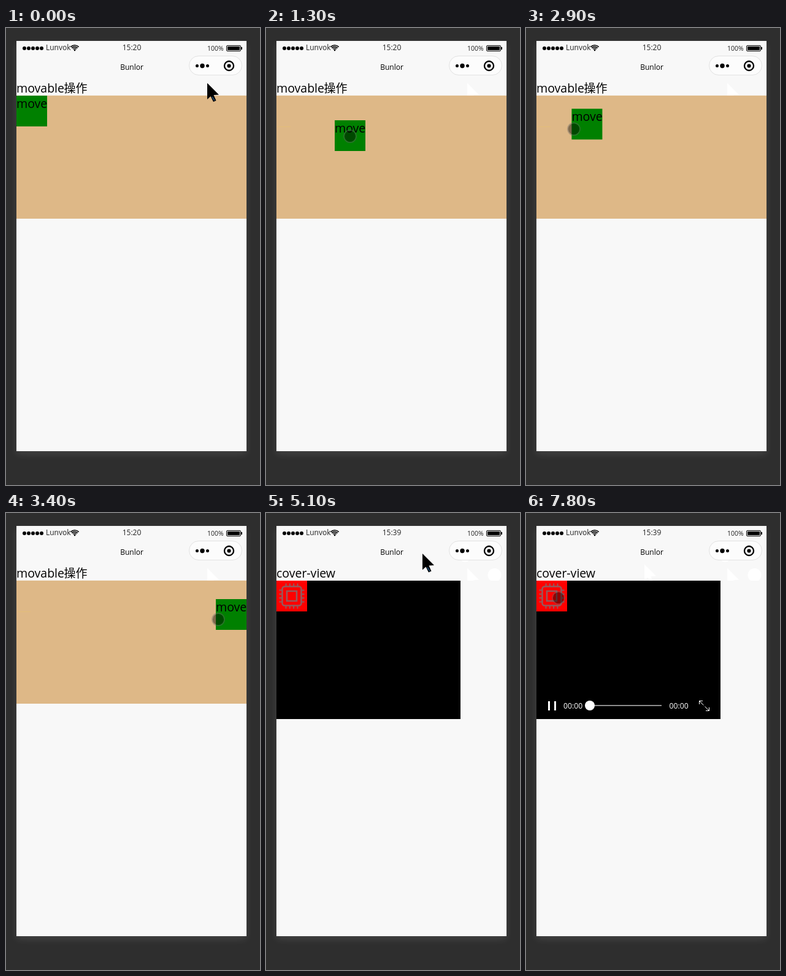
An HTML page with a canvas for the animation above (8000 ms loop, 414 px wide and 743 px high).

```html
<!DOCTYPE html>
<html lang="zh">
<head>
<meta charset="utf-8">
<title>movable / cover-view</title>
<style>
html, body { margin: 0; width: 100%; height: 100%; overflow: hidden; background: #2e2e2e; }
canvas { display: block; }
</style>
</head>
<body>
<canvas id="stage" width="414" height="743"></canvas>
<script>
const c = document.getElementById('stage').getContext('2d');
const LOOP = 8000, STEP = 100, SWITCH = 4800;
const SANS = '"Open Sans", "Noto Sans", sans-serif';
const CJK = '"Noto Sans CJK SC", "Noto Sans CJK", sans-serif';
const TAU = Math.PI * 2;

// Each move runs from t0 to t1 and ends at [x, y]; sag bends its path,
// grab is where the finger holds the box when the move ends.
const drags = [
  { t0: 400, t1: 800, to: [113.4, 153.4] },
  { t0: 800, t1: 1100, to: [233, 150] },
  { t0: 1100, t1: 1300, to: [112, 150] },
  { t0: 1300, t1: 1800, to: [236, 110], sag: 70, grab: [57.5, 13.5] },
  { t0: 2100, t1: 2900, to: [74.4, 131.3], sag: 33, grab: [3.6, 33] },
  { t0: 2900, t1: 3400, to: [342, 140], grab: [4, 33] },
  { t0: 3400, t1: 3700, to: [142, 142], grab: [18, 48] },
  { t0: 4100, t1: 4400, to: [342, 110], sag: -16, ease: 1.6, grab: [61, 50] }
];
const taps = [
  { t0: 5200, t1: 5700, to: [46, 160], sag: 40 },
  { t0: 5800, t1: 6200, to: [43, 139] },
  { t0: 6400, t1: 6900, to: [58, 145] },
  { t0: 7000, t1: 7200, to: [53, 138] }
];

const mix = (a, b, k) => a.map((v, i) => v + (b[i] - v) * k);
const progress = (t, t0, t1) => Math.min(1, Math.max(0, (t - t0) / (t1 - t0)));

function follow(moves, t, pos, hold = [25, 26]) {
  for (const { t0, t1, to, sag = 0, ease = 1, grab = hold } of moves) {
    if (t < t0) break;
    const k = progress(t, t0, t1);
    const e = k ** ease;
    pos = mix(pos, to, e);
    pos[1] += sag * Math.sin(Math.PI * k);
    hold = mix(hold, grab, e);
  }
  return { pos, finger: [pos[0] + hold[0], pos[1] + hold[1]] };
}

function rect(x, y, w, h, color) {
  c.fillStyle = color;
  c.fillRect(x, y, w, h);
}

function disc(x, y, r, color) {
  c.fillStyle = color;
  c.beginPath();
  c.arc(x, y, r, 0, TAU);
  c.fill();
}

function arc(x, y, r, width, color, from = 0, to = TAU) {
  c.strokeStyle = color;
  c.lineWidth = width;
  c.beginPath();
  c.arc(x, y, r, from, to);
  c.stroke();
}

function rounded(x, y, w, h, r, stroke, width = 1, fill = 'transparent') {
  c.strokeStyle = stroke;
  c.lineWidth = width;
  c.fillStyle = fill;
  c.beginPath();
  c.roundRect(x, y, w, h, r);
  c.fill();
  c.stroke();
}

function line(points, width, color) {
  c.strokeStyle = color;
  c.lineWidth = width;
  c.beginPath();
  points.forEach(([x, y]) => c.lineTo(x, y));
  c.stroke();
}

function text(str, x, y, size, color = '#000', align = 'left', font = SANS, weight = 400) {
  c.font = `${weight} ${size}px ${font}`;
  c.fillStyle = color;
  c.textAlign = align;
  c.fillText(str, x, y);
}

function arrow(x, y, color) {
  const shape = [[0, -0.5], [0, 26], [5.5, 21], [10, 30], [14.5, 28], [10.5, 19], [19, 18.5]];
  c.fillStyle = color;
  c.beginPath();
  shape.forEach(([dx, dy]) => c.lineTo(x + dx, y + dy));
  c.fill();
}

function pointer([x, y]) {
  arrow(x, y, '#000');
  line([[x + 8, y + 22], [x + 12, y + 28]], 2, '#1d4468');
}

function touch([x, y]) {
  disc(x, y, 9.2, 'rgba(0,0,0,.43)');
  arc(x, y, 10, 1.8, 'rgba(100,100,100,.4)');
}

// Faint marks left on the page where pointers have been
function traces(t) {
  c.save();
  c.beginPath();
  c.rect(17, 21, 375, 89);
  c.clip();
  if (t >= 100) arrow(328, 90, '#fff');
  if (t >= 4400) disc(372.5, 101, 11, '#fff');
  if (t >= 5100) rounded(317, 50, 15, 29, 6, '#fff', 1, '#fff');
  if (t >= 5300) arrow(193, 84, '#fff');
  c.restore();
}

function backdrop() {
  rect(0, 0, 414, 743, '#2e2e2e');
  c.save();
  c.shadowColor = 'rgba(255,255,255,.1)';
  c.shadowBlur = 11;
  c.shadowOffsetY = 5;
  rect(17, 21, 375, 667, '#f8f8f8');
  c.restore();
}

function statusBar(clock) {
  for (let i = 0; i < 5; i++) disc(30 + i * 7, 33, 3, '#000');
  text('Lunvok', 65, 36, 12, '#222');
  for (let r = 3.8; r < 10; r += 2.6) {
    arc(112, 37, r, 1.6, '#000', -Math.PI * 0.76, -Math.PI * 0.24);
  }
  disc(112, 36, 1.4, '#000');
  text(clock, 205, 36, 12, '#222', 'center');
  text('100%', 328, 37, 10.5, '#222');
  rounded(359.5, 28.5, 23, 9, 1.5, '#000');
  rect(361, 30, 20, 6, '#000');
  rect(383, 31, 2, 4, '#000');
}

function navBar() {
  text('Bunlor', 205, 68, 12, '#000', 'center');
  rounded(298.5, 45.5, 86, 31, 15.5, '#e2e2e2', 1, 'rgba(255,255,255,.6)');
  for (const i of [-1, 0, 1]) disc(320 + i * 8.5, 61.5, i ? 2.5 : 3.7, '#000');
  arc(363.5, 61.5, 7.5, 2.3, '#000');
  disc(363.5, 61.5, 3.1, '#000');
}

function movable(t) {
  text('movable', 17, 105, 19.5);
  text('操作', 94.5, 105, 19, '#000', 'left', CJK, 300);
  rect(17, 109.8, 375, 200.2, '#deb887');
  if (t >= 500) rect(19, 160, 21, 1, '#e3bd78');
  const { pos: [x, y], finger } = follow(drags, t, [17, 110]);
  rect(x, y, 50, 50, '#008000');
  text('move', x, y + 20, 19.5);
  if (t >= 900 && t < 4500) touch(finger);
  if (t < 300) pointer(mix([328, 90], [126, 110], progress(t, 0, 200)));
}

function chip(x, y) {
  const tint = '#94595c';
  rounded(x - 15.5, y - 15.5, 31, 31, 4, tint, 2.6);
  rounded(x - 8, y - 8, 16, 16, 0, tint, 2.6);
  for (let side = 0; side < 4; side++) {
    c.save();
    c.translate(x, y);
    c.rotate(side * TAU / 4);
    for (let i = 0; i < 4; i++) rect(i * 6.3 - 10.5, 16, 2, 4.5, tint);
    c.restore();
  }
}

function controls(playing) {
  const white = '#fff';
  if (playing) {
    rect(36, 306, 3, 15, white);
    rect(46, 306, 3, 15, white);
  } else {
    c.fillStyle = white;
    c.beginPath();
    c.moveTo(36, 306);
    c.lineTo(49, 313.5);
    c.lineTo(36, 321);
    c.fill();
  }
  text('00:00', 61, 318, 12.2, white);
  text('00:00', 233.5, 318, 12.2, white);
  rect(104, 312, 117, 2, '#8c8c8c');
  disc(104, 313, 8, white);
  // Two mirrored arrows of the full-screen icon
  for (const s of [-1, 1]) {
    const at = (dx, dy) => [290.5 + s * dx, 313.5 + s * dy];
    line([at(8, 2.5), at(8, 8), at(2.5, 8)], 1, white);
    line([at(1, 1), at(8, 8)], 1, white);
  }
}

function coverView(t) {
  text('cover-view', 17, 105, 19.5);
  rect(17, 110, 300, 225, '#000');
  if (t >= 6400) controls(t < 7200 || t >= 7800);
  rect(17, 110, 50, 50, '#f00');
  chip(42, 135);
  if (t >= 5300) touch(follow(taps, t, [193, 84]).pos);
  else pointer(mix([317, 49], [193, 84], progress(t, 5000, 5200)));
}

function draw(now) {
  const t = Math.floor((now % LOOP) / STEP) * STEP;
  const second = t >= SWITCH;
  backdrop();
  traces(t);
  statusBar(second ? '15:39' : '15:20');
  navBar();
  (second ? coverView : movable)(t);
}

const start = performance.now();
function tick() {
  draw(performance.now() - start);
  requestAnimationFrame(tick);
}
tick();
</script>
</body>
</html>
```
